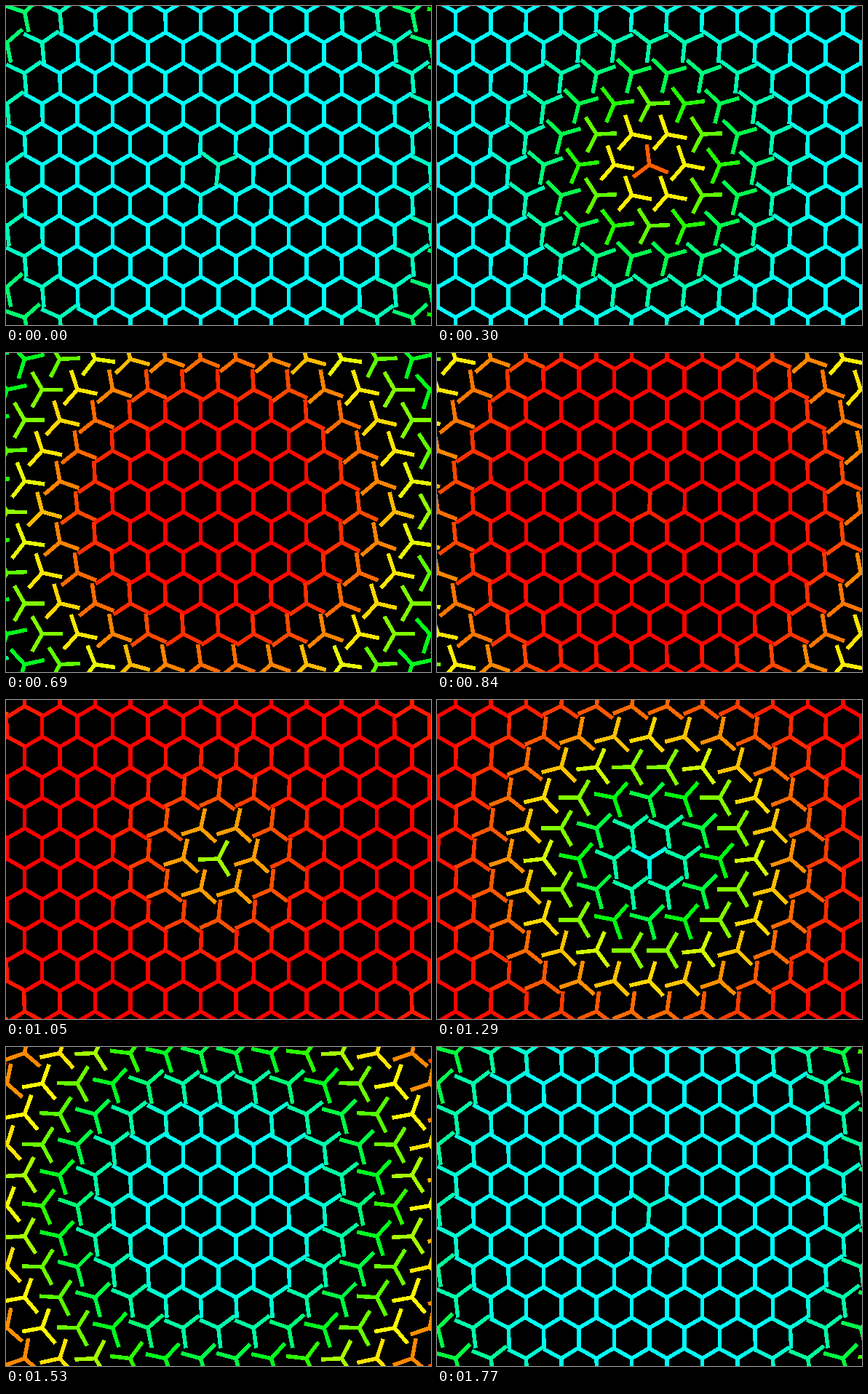
Animation of 584x438 px, one loop 1.8 s. Source, as an HTML page:

```html
<!DOCTYPE html>
<html lang="en">
<head>
<meta charset="utf-8">
<title>Hexagon ripple</title>
<style>
  html, body { margin: 0; width: 100%; height: 100%; overflow: hidden; background: #000; }
  svg { display: block; }
  path { fill: none; stroke-width: 5.5; shape-rendering: crispEdges; }
</style>
</head>
<body>
<svg id="stage" width="584" height="438" viewBox="0 0 584 438"></svg>
<script>
const stage = document.getElementById('stage');
const LOOP = 1800, HALF = LOOP / 2, STEP = 30;
const CX = 291.8, CY = 218;
const ARM = 27.95, GAP = ARM * Math.sqrt(3), ROW = ARM * 1.5;
const LEAD = 160;   // when the centre is halfway through its turn, ms
const DELAY = 1.8;  // ripple delay, ms per pixel from the centre

// Three arms from the middle: down, upper left, upper right.
const SHAPE = `M0 0V${ARM}M0 0L${-GAP / 2} ${-ARM / 2}M0 0L${GAP / 2} ${-ARM / 2}`;

function addNode(x, y) {
  const path = document.createElementNS('http://www.w3.org/2000/svg', 'path');
  path.setAttribute('d', SHAPE);
  stage.append(path);
  const dist = Math.hypot(x, y);
  // The turn gets softer away from the centre.
  return { path, x: CX + x, y: CY + y, dist, power: 3.8 - 0.003 * dist };
}

const nodes = [];
for (let r = -6; r <= 6; r++) {
  for (let c = -8; c <= 8; c++) {
    nodes.push(addNode((c + (r & 1) / 2) * GAP, r * ROW));
  }
}

function ease(p, power) {
  return p < 0.5 ? 0.5 * (2 * p) ** power : 1 - 0.5 * (2 - 2 * p) ** power;
}

function drawNode({ path, x, y, dist, power }, time) {
  const phase = (time - LEAD - DELAY * dist) / HALF + 0.5;
  const turn = Math.floor(phase);
  const part = ease(phase - turn, power);
  const hue = 180 * (turn % 2 ? part : 1 - part);
  path.setAttribute('transform', `translate(${x} ${y}) rotate(${60 * (turn + part)})`);
  path.setAttribute('stroke', `hsl(${hue}, 100%, 50%)`);
}

function frame() {
  const time = performance.now() % LOOP;
  const held = Math.floor(time / STEP) * STEP;
  for (const node of nodes) drawNode(node, held);
  requestAnimationFrame(frame);
}
frame();
</script>
</body>
</html>
```
